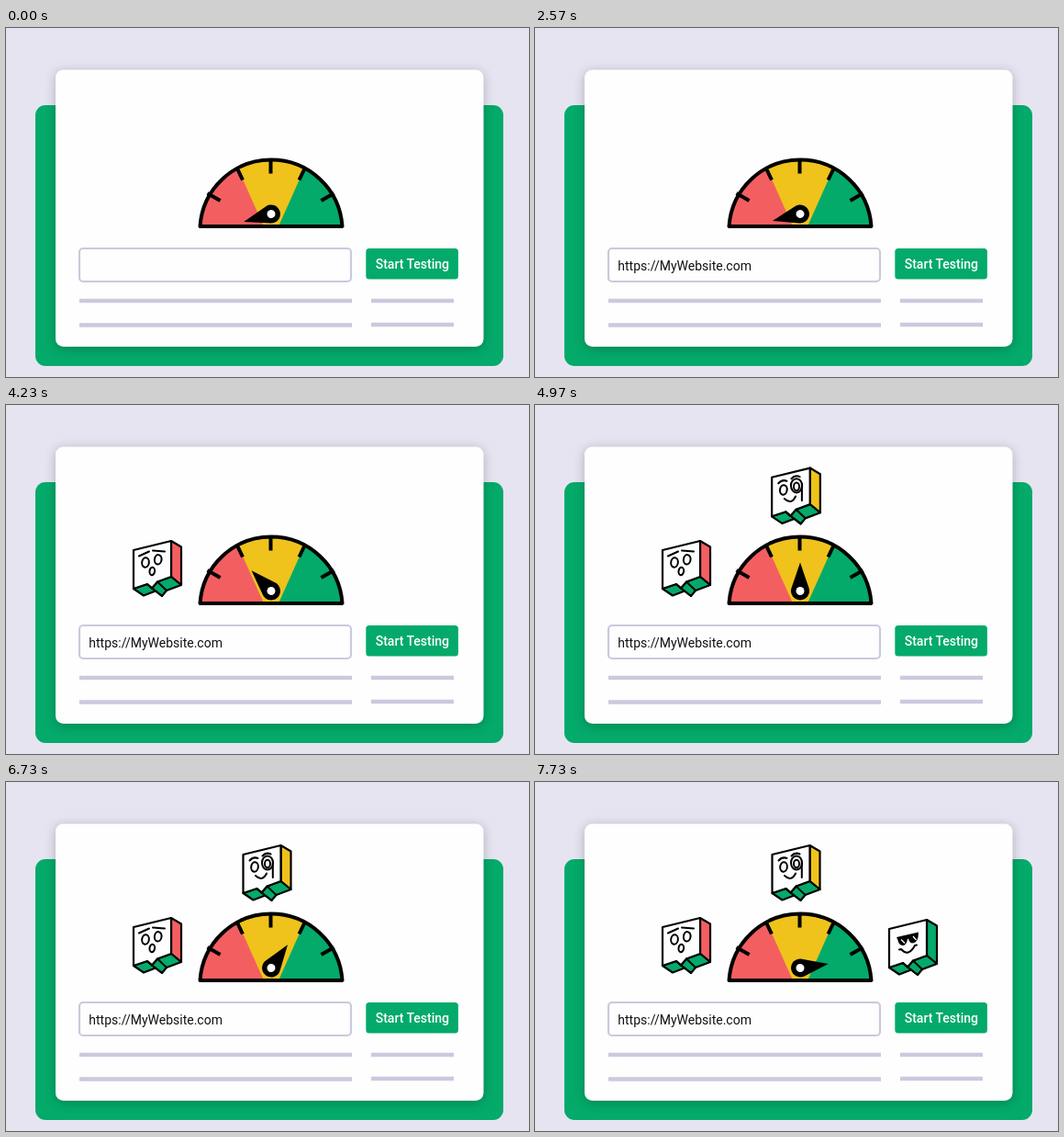
Animation of 570x380 px, one loop 8830 ms. Source, as an HTML page:

```html
<!DOCTYPE html>
<html lang="en">
<head>
<meta charset="utf-8">
<title>Website test gauge</title>
<style>
  html, body { margin: 0; width: 100%; height: 100%; overflow: hidden; background: #e6e4f1; }
  svg { display: block; width: 570px; height: 380px; }
  text { font: 14px Roboto, Arial, sans-serif; white-space: pre; }
  .card { filter: drop-shadow(0 2px 6px rgba(0, 0, 0, .24)); }
  .ink { fill: none; stroke: #000; stroke-width: 2; stroke-linecap: round; stroke-linejoin: round; }
  .box { stroke: #000; stroke-width: 2.2; stroke-linejoin: round; }
</style>
</head>
<body>
<svg viewBox="0 0 570 380">
  <defs>
    <clipPath id="dome"><path d="M211.5 216A77.67 77.67 0 0 1 366.5 216Z"/></clipPath>
    <g id="bubble" class="box">
      <path d="M15-30L26-23.5V18L15 9Z"/>
      <path fill="#04aa6a" d="M-26 22L-11 17L-6 21.5L0 14.5L15 9L26 18L10 24L5 30L-2 24.5L-15 29.5Z"/>
      <path fill="#fefefe" d="M-26-20L15-30V9L0 14.5L-6 21.5L-11 17L-26 22Z"/>
      <path class="ink" d="M-11 17L-2 24.5M-6 21.5L5 30M0 14.5L10 24"/>
    </g>
  </defs>

  <rect width="570" height="380" fill="#e6e4f1"/>
  <rect x="32" y="84" width="510" height="284" rx="11" fill="#04aa6a"/>
  <rect class="card" x="54" y="45.5" width="466.5" height="301.5" rx="8.5" fill="#fefefe"/>

  <rect x="80" y="240" width="296" height="36" rx="4" fill="#fefefe" stroke="#ccc8de" stroke-width="2.2"/>
  <path d="M80 297H377M80 323.5H377M398 297H488M398 323H488" stroke="#ccc8de" stroke-width="4.4"/>
  <text id="url" x="90.3" y="263.5" fill="#111"></text>

  <g id="button">
    <rect x="392.3" y="240" width="100.6" height="33.5" rx="3.5" fill="#04aa6a"/>
    <text x="402.7" y="262" fill="#fff" font-weight="500" style="font-weight:500">Start Testing</text>
  </g>

  <g clip-path="url(#dome)">
    <rect x="209" y="140" width="80" height="78" fill="#f35f61"/>
    <rect x="289" y="140" width="80" height="78" fill="#04aa6a"/>
    <path d="M247 140L281 216H297L331 140Z" fill="#efc31b"/>
  </g>
  <path d="M211.5 216A77.67 77.67 0 0 1 366.5 216Z" fill="none" stroke="#000" stroke-width="4" stroke-linejoin="round"/>
  <path d="M288.5 144V158.5M251.5 152L258 165.5M326 152L319.5 165.5M219.5 180L233.5 188M357.5 180L343.5 188" stroke="#000" stroke-width="4"/>

  <g id="needle">
    <path d="M0-31L9.5-3.2A10 10 0 1 1-9.5-3.2Z"/>
    <circle r="4.5" fill="#fefefe"/>
  </g>

  <g class="face" fill="#f35f61">
    <use href="#bubble"/>
    <g class="ink">
      <path d="M-20-13.5L-9-18.5M-5-19.5L8-18.5"/>
      <ellipse cx="-13" cy="-6.5" rx="3.8" ry="5.2" transform="rotate(8 -13 -6.5)"/>
      <ellipse cx=".7" cy="-9.7" rx="3.8" ry="5.2" transform="rotate(8 .7 -9.7)"/>
      <ellipse cx="-5.7" cy="3" rx="2.8" ry="4.2" transform="rotate(8 -5.7 3)"/>
    </g>
  </g>

  <g class="face" fill="#efc31b">
    <use href="#bubble"/>
    <g class="ink">
      <path d="M-19-13.5Q-15-18-10-16M-5-18.5Q-1-23 4-20.5M6.3-11V5M-12.5 3Q-5 10-.5 .5"/>
      <ellipse cx="-13.5" cy="-6.5" rx="3.8" ry="5.2" transform="rotate(8 -13.5 -6.5)"/>
      <ellipse cx=".5" cy="-11" rx="6" ry="7.5"/>
      <ellipse cx=".5" cy="-10" rx="3" ry="4.3"/>
    </g>
  </g>

  <g class="face" fill="#04aa6a">
    <use href="#bubble"/>
    <path fill="#000" d="M-18-11L6-16.5L5.5-11Q4-4.5-1-4.5Q-4-5-5-9.5L-6-9Q-7-2.5-11-2Q-16-2.5-16.5-8Z"/>
    <path d="M-13-8.5L-9-4.5M0-12L3.5-8" stroke="#fefefe" stroke-width="1.3"/>
    <path class="ink" d="M-15 2.5L-13 2Q-5 11 2-2L4-2.5"/>
  </g>
</svg>
<script>
  const LOOP = 8830;
  const URL_TEXT = "https://MyWebsite.com";
  const TYPE_START = 30, TYPE_STEP = 66.9;

  // [time, value] pairs
  const ANGLE = [[2490, -106], [2950, -77], [3395, -106], [4900, 0], [5060, 0], [5580, 42], [6090, 0], [7490, 81.5]];
  const PRESS = [[1880, 1], [2070, .92], [2270, 1]];
  const FACES = [
    { x: 165, y: 178, start: 2680 },
    { x: 284.5, y: 99, start: 4262 },
    { x: 412, y: 180, start: 6905 }
  ];

  const $ = id => document.getElementById(id);
  const faces = [...document.querySelectorAll(".face")];
  const sine = p => (1 - Math.cos(Math.PI * p)) / 2;
  const easeOut = p => 1 - (1 - p) ** 3;

  function track(keys, t) {
    if (t <= keys[0][0]) return keys[0][1];
    for (let i = 1; i < keys.length; i++) {
      const [t0, a] = keys[i - 1], [t1, b] = keys[i];
      if (t < t1) return a + (b - a) * sine((t - t0) / (t1 - t0));
    }
    return keys[keys.length - 1][1];
  }

  // Grow past full size, then settle
  function pop(t) {
    const peak = 1.065;
    if (t <= 0) return 0;
    if (t < 450) return peak * easeOut(t / 450);
    return peak + (1 - peak) * sine(Math.min(1, (t - 450) / 375));
  }

  function draw(t) {
    const typed = t < TYPE_START ? 0 : Math.floor((t - TYPE_START) / TYPE_STEP) + 1;
    $("url").textContent = URL_TEXT.slice(0, typed);

    const s = track(PRESS, t);
    $("button").setAttribute("transform", `translate(442.5 257) scale(${s}) translate(-442.5 -257)`);
    $("needle").setAttribute("transform", `translate(289 202.5) rotate(${track(ANGLE, t)})`);

    FACES.forEach((f, i) => {
      const k = pop(t - f.start);
      faces[i].setAttribute("visibility", k ? "visible" : "hidden");
      faces[i].setAttribute("transform", `translate(${f.x} ${f.y}) scale(${k})`);
    });
  }

  const begin = performance.now();
  function tick() {
    draw((performance.now() - begin) % LOOP);
    requestAnimationFrame(tick);
  }
  tick();
</script>
</body>
</html>
```
